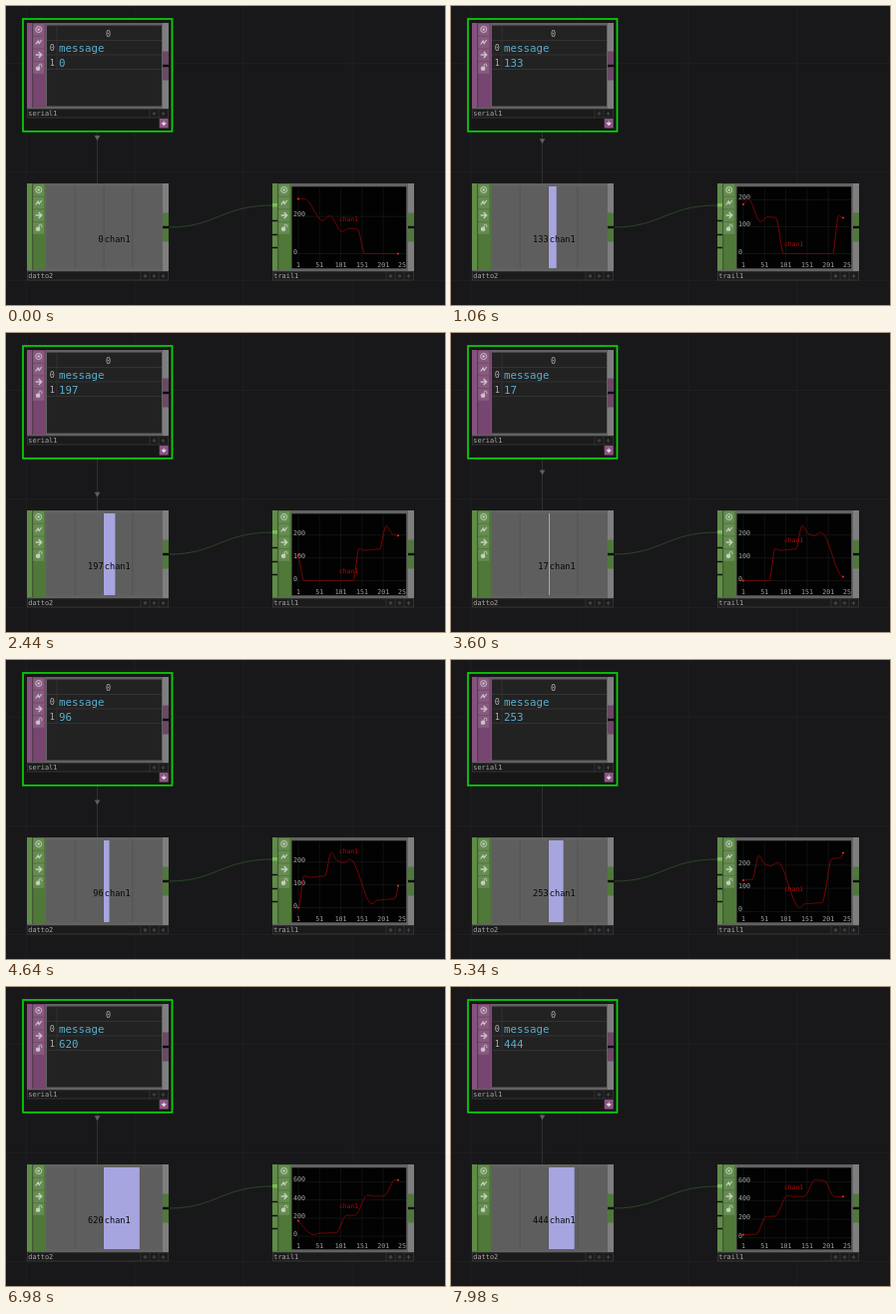
An HTML page that plays this animation: 440x300 px, repeating every 8000 ms.

```html
<!DOCTYPE html>
<html>
<head>
<meta charset="utf-8">
<style>
html, body { margin: 0; width: 100%; height: 100%; overflow: hidden; background: #18181a; }
svg { display: block; width: 440px; height: 300px; }
text { font-family: "DejaVu Sans Mono", monospace; white-space: pre; }
</style>
</head>
<body>
<svg id="stage" viewBox="0 0 440 300"></svg>
<script>
const LOOP = 8000, SPAN = 4000, SAMPLES = 240;
const stage = document.getElementById('stage');

const set = (el, attrs) => { for (const k in attrs) el.setAttribute(k, attrs[k]); };
function add(tag, attrs, text = '') {
  const el = document.createElementNS('http://www.w3.org/2000/svg', tag);
  set(el, attrs);
  el.textContent = text;
  return stage.appendChild(el);
}
const rect = (x, y, width, height, fill) => add('rect', { x, y, width, height, fill });
const path = (d, stroke, w = 1, fill = 'none') => add('path', { d, stroke, 'stroke-width': w, fill });
const label = (x, y, size, fill, text, anchor = 'start') =>
  add('text', { x, y, 'font-size': size, fill, 'text-anchor': anchor }, text);

// Value of a list of [ms, level] points at time t
const linear = u => u;
const smooth = u => u * u * (3 - 2 * u);
function track(points, t, ease) {
  const i = points.findIndex(p => p[0] > t);
  if (i < 0) return points[points.length - 1][1];
  if (!i) return points[0][1];
  const [t0, a] = points[i - 1], [t1, b] = points[i];
  return a + (b - a) * ease((t - t0) / (t1 - t0));
}

// Turning points of the sensor knob
const knob = [
  [-3750, 295], [-3020, 178], [-2740, 203], [-2250, 119], [-1960, 136], [-1640, 134],
  [-1320, 0], [640, 0], [880, 140], [1060, 133], [1700, 138], [1960, 240],
  [2240, 203], [2440, 197], [2720, 211], [3600, 17], [3850, 34], [4490, 38],
  [4900, 228], [5240, 231], [5760, 453], [6060, 442], [6420, 444],
  [6860, 622], [7200, 616], [7640, 442], [7980, 444]
];
const reading = t => track(knob, t, smooth);

// Wire arrow: about one trip per second, with two slower stretches
const trips = [[0, 0], [2440, 2.4], [3600, 3.1], [4640, 4.14], [6060, 5.08], [LOOP, 7]];

function icons(x, y, cell, line) {
  for (let i = 0; i < 4; i++) rect(x - 5.5, y - 5.5 + i * 12.7, 11, 11.7, cell);
  add('circle', { cx: x, cy: y, r: 3, fill: 'none', stroke: line });
  add('circle', { cx: x, cy: y, r: 1.2, fill: line });
  path(`M${x - 3} ${y + 15}l2.5 -3.5l1 2.5l2.5 -3.5`, line, 1.2);
  path(`M${x - 3} ${y + 25.5}h5M${x} ${y + 22.5}l3 3l-3 3`, line, 1.4);
  add('circle', { cx: x - 0.6, cy: y + 39.2, r: 2.3, fill: line });
  path(`M${x + 0.5} ${y + 37.5}v-1.5a1.3 1.3 0 0 1 2.6 0v1.5`, line, 0.9);
}

function node(x, y, h, name, tone, marks) {
  const right = x + 136, mid = y + h / 2, foot = y + h;
  rect(x, y, 142, h, '#626262');
  rect(x, y, 19, h - 1, tone.side);
  rect(x, y, 5.5, h - 1, tone.edge);
  path(`M${x + 5.7} ${y}v${h - 1}`, '#2c2c2c', 0.6);
  icons(x + 11.7, y + 6.5, tone.cell, tone.line);
  rect(right, y, 6, h, '#7e7e7e');
  rect(right, mid - 14.5, 6, 29, tone.plug);
  rect(right, mid - 1.2, 6.5, 2.4, '#0c0c0c');

  add('rect', { x: x + 0.5, y: foot + 0.7, width: 141, height: 8.3, fill: '#1b1b1c', stroke: '#3a3a3b', 'stroke-width': 0.8 });
  label(x + 1.3, foot + 7.3, 6.9, '#aaa', name);
  for (let i = 0; i < marks; i++) {
    const mx = x + 136.5 - i * 9, my = foot + 5;
    path(`M${mx - 4.5} ${foot + 1}v8`, '#3a3a3b', 0.7);
    if (i) add('circle', { cx: mx, cy: my, r: 1.4, fill: '#3c3c42', stroke: i > 1 ? '#3d4c38' : '#3a3a46', 'stroke-width': 0.8 });
    else path(`M${mx - 2} ${my}h4M${mx} ${my - 2}v4`, '#4a4a4c', 0.9);
  }
}

const purple = { side: '#774670', edge: '#85527d', cell: '#875b80', line: '#d0bfcd', plug: '#6b4866' };
const green = { side: '#4f7839', edge: '#5f8c47', cell: '#668c53', line: '#c2d3b8', plug: '#50783b' };

// Network background and wires
rect(0, 0, 440, 300, '#18181a');
for (let i = 0; i < 4; i++) path(`M${20 + i * 109} 0V300`, '#1e1e20');
for (let i = 0; i < 3; i++) path(`M0 ${57.5 + i * 109}H440`, '#1e1e20');
path('M91.5 126V178', '#303031');
path('M163 222C211 222 216 200 267 200', '#2e4a2a', 0.9);
const arrow = path('', 'none', 0, '#606060');

// Serial table
add('rect', { x: 17, y: 13, width: 149.5, height: 112.8, fill: '#161617', stroke: '#08d408', 'stroke-width': 1.7 });
node(21, 17, 86, 'serial1', purple, 2);
rect(41, 19.5, 115, 81, '#222223');
path('M41 34.5H156M41 49H156M41 63.5H156M51 19.5V63.5', '#363637', 0.8);
label(102.5, 30.5, 8.5, '#b0b0b0', '0', 'middle');
[0, 1].forEach(i => label(46.3, 45.3 + i * 14.5, 8.5, '#b0b0b0', i, 'middle'));
label(53, 46, 10.8, '#5aaecb', 'message');
const cell = label(53, 60.5, 10.8, '#5aaecb');
rect(153.7, 113, 9, 9.5, '#8c5584');
path('M158.2 115.3v4M156.2 117.6h4l-2 2.2z', '#e5d6e2', 0.9, '#e5d6e2');

// Channel bar
node(21, 178, 88, 'datto2', green, 3);
rect(40.5, 181, 116, 82.5, '#5e5e5e');
for (let i = 0; i < 3; i++) path(`M${69.3 + i * 28.8} 181V263`, '#525252', 0.8);
const bar = rect(98, 181, 0, 82, '#a7a5e0');
const count = label(97.6, 237, 8.6, '#080808', '', 'end');
label(98.8, 237, 8.6, '#080808', 'chan1');

// Trail graph
node(267, 178, 88, 'trail1', green, 3);
rect(267, 198, 5, 3.5, '#78c055');
path('M266 215.5h6M266 229.5h6M266 242.5h6', '#101010', 1.3);
rect(286.5, 181.3, 114.7, 82, '#020202');
for (let i = 0; i < 5; i++) {
  const x = 293 + i * 21.3;
  path(`M${x} 181.3V256`, '#191919', 0.7);
  label(x, 262, 6.6, '#a4a4a4', 1 + i * 50, 'middle');
}
label(393, 262, 6.6, '#a4a4a4', '25');
const ticks = [0, 1, 2, 3].map(() => ({
  line: path('', '#191919', 0.7),
  text: label(288, 0, 6.7, '#a4a4a4')
}));
const trail = path('', '#940505', 0.85);
const dots = [293, 393].map(cx => add('circle', { cx, r: 1, fill: '#f02c2c' }));
const tag = label(343.5, 0, 6.4, '#b00808', 'chan1', 'middle');

function draw(t) {
  const now = Math.round(reading(t));
  cell.textContent = count.textContent = now;
  set(bar, { width: now * 0.0578 });

  const ay = 104 + (26 + track(trips, t, linear) * 74) % 74;
  set(arrow, { d: `M88.7 ${ay}h5.6l-2.8 5z`, opacity: ay > 125 && ay < 174 ? 1 : 0 });

  const values = Array.from({ length: SAMPLES + 1 }, (_, i) => reading(t - SPAN + i * SPAN / SAMPLES));
  const low = Math.min(...values), range = Math.max(...values) - low || 1;
  const py = v => 248.5 - 55 * (v - low) / range;
  const points = values.map((v, i) => `${(293 + 100 * i / SAMPLES).toFixed(2)} ${py(v).toFixed(2)}`);
  set(trail, { d: 'M' + points.join('L') });
  set(dots[0], { cy: py(values[0]) });
  set(dots[1], { cy: py(values[SAMPLES]) });
  set(tag, { y: py(values[SAMPLES / 2]) - 7.2 });

  const step = range < 250 ? 100 : 200;
  ticks.forEach(({ line, text }, i) => {
    const y = py(i * step), opacity = y > 191 && y < 253 ? 1 : 0;
    set(line, { d: `M287 ${y}H401`, opacity });
    set(text, { y, opacity });
    text.textContent = i * step;
  });
}

function frame() {
  draw(performance.now() % LOOP);
  requestAnimationFrame(frame);
}
frame();
</script>
</body>
</html>
```
